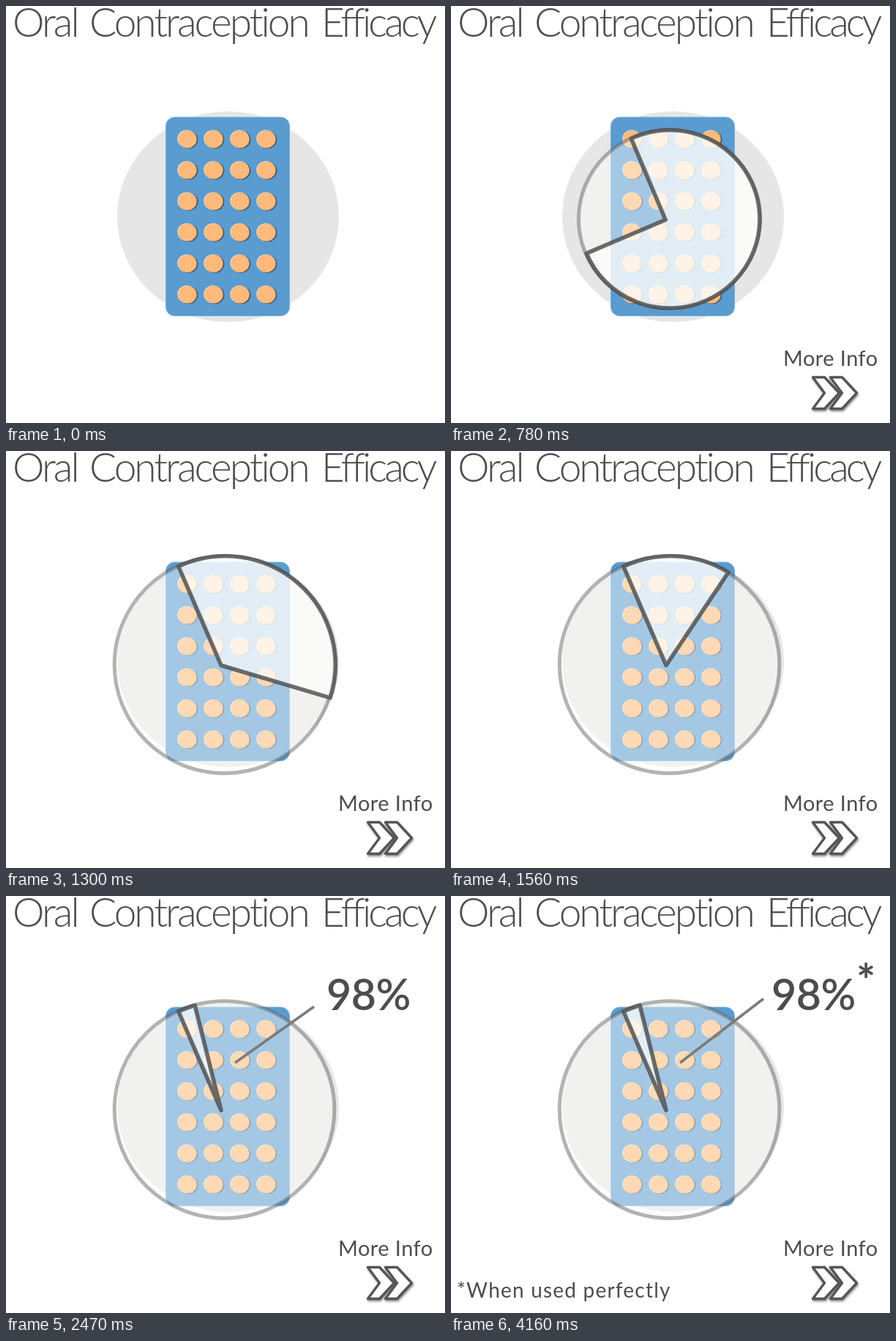
An HTML page that plays this animation: 600x570 px, repeating every 6.89 s.

```html
<!DOCTYPE html>
<html lang="en">
<head>
<meta charset="utf-8">
<title>Oral Contraception Efficacy</title>
<style>
  html, body { margin: 0; width: 100%; height: 100%; overflow: hidden; background: #fff; }
  svg { display: block; width: 600px; height: 570px; }
  text { font-family: Lato, "Open Sans", sans-serif; fill: #4d4d4f; }
  #title { font-size: 55px; font-weight: 300; letter-spacing: -3px; }
  #title .tight { letter-spacing: -4px; }
  #value { font-size: 59px; font-weight: 600; letter-spacing: -.5px; }
  #star { font-size: 62px; font-weight: 700; }
  #more text { font-size: 29px; letter-spacing: .45px; }
  #note { font-size: 28px; letter-spacing: 1.2px; }
  .chevron { fill: #fff; stroke: #555; stroke-width: 3.4; stroke-linejoin: round; }
  #more g { filter: drop-shadow(1px 2px 1.5px rgba(0, 0, 0, .45)); }
  #disc { fill: rgba(253, 254, 250, .45); stroke: rgba(96, 96, 96, .48); stroke-width: 5; }
  #wedge { fill: rgba(255, 255, 254, .68); stroke: rgba(80, 80, 80, .84); stroke-width: 5.6; stroke-linejoin: round; }
  #pointer { stroke: #7b7b7b; stroke-width: 3.6; }
</style>
</head>
<body>
<svg viewBox="0 0 600 570">
  <text id="title" y="42"><tspan x="9">Oral</tspan> <tspan x="114">Contraception</tspan> <tspan x="431" class="tight">Efficacy</tspan></text>
  <ellipse cx="303.5" cy="288" rx="151.5" ry="144" fill="#e6e6e6"/>
  <rect x="218.5" y="152" width="169" height="271.5" rx="12" fill="#5a9bd0" stroke="#78acd9"/>
  <g id="pills"></g>
  <ellipse id="disc"/>
  <path id="wedge"/>
  <line id="pointer" x1="313" y1="228"/>
  <text id="value" x="438" y="155.500">98%</text>
  <text id="star" x="554" y="138">*</text>
  <g id="more">
    <text x="454" y="492">More Info</text>
    <g>
      <path class="chevron" d="M494.500 507.500h16l20 21.500-20 21.500h-16l16-21.500z"/>
      <path class="chevron" d="M518.500 507.500h16l20 21.500-20 21.500h-16l16-21.500z"/>
    </g>
  </g>
  <text id="note" x="8" y="549">*When used perfectly</text>
</svg>
<script>
const LOOP = 6890, STEP = 130, LAST = 4160;
const $ = id => document.getElementById(id);
const set = (id, attrs) => {
  for (const name in attrs) $(id).setAttribute(name, attrs[name]);
};

// Key tables: [time, value], linear in between.
const tracks = {
  size: [[260, 0], [390, .06], [520, .31], [780, .82], [910, 1]],
  sweep: [[390, 335], [520, 311], [1040, 183.8], [1560, 31.8], [1820, -16.2]],
  button: [[130, .6], [260, .9], [390, 1.08], [520, .965], [650, 1]],
  pointer: [[1820, 0], [2340, 1]],
  tipX: [[2340, 420.5], [4160, 427]],
  tipY: [[2340, 152], [4160, 140.5]],
  value: [[1820, 0], [2210, 1]]
};

function at(name, t) {
  const keys = tracks[name];
  if (t <= keys[0][0]) return keys[0][1];
  for (let i = 1; i < keys.length; i++) {
    const [t0, a] = keys[i - 1], [t1, b] = keys[i];
    if (t <= t1) return a + (b - a) * (t - t0) / (t1 - t0);
  }
  return keys[keys.length - 1][1];
}

function drawPills() {
  const pill = (x, y, fill) => `<ellipse cx="${x}" cy="${y}" rx="12.7" ry="12.1" fill="${fill}"/>`;
  let html = '';
  for (let row = 0; row < 6; row++) {
    for (let col = 0; col < 4; col++) {
      const x = 248 + col * 36, y = 182 + row * 42.5;
      html += pill(x + 1.6, y + .6, '#4d4f52') + pill(x - 1, y - .5, '#f8e2cb') + pill(x, y, '#fdba7c');
    }
  }
  $('pills').innerHTML = html;
}

function drawPie(t) {
  const size = at('size', t), end = at('sweep', t), start = -25.3;
  const cx = 294 + 4.5 * size, cy = 288 + 4 * size;
  const rx = 150.3 * size, ry = 148.5 * size;
  // The wedge sits slightly right of the disc.
  const rim = deg => {
    const a = deg * Math.PI / 180;
    return `${cx + 1.5 * size + rx * Math.sin(a)} ${cy - ry * Math.cos(a)}`;
  };
  const visible = size > 0 ? 1 : 0;
  set('disc', { cx, cy, rx, ry, opacity: visible });
  set('wedge', {
    d: `M${cx - 4.5} ${cy + 1}L${rim(start)}A${rx} ${ry} 0 ${end - start > 180 ? 1 : 0} 1 ${rim(end)}Z`,
    opacity: visible
  });
}

function draw(t) {
  drawPie(t);
  const grow = at('pointer', t), scale = at('button', t);
  set('pointer', {
    x2: 313 + (at('tipX', t) - 313) * grow,
    y2: 228 + (at('tipY', t) - 228) * grow,
    opacity: grow > 0 ? 1 : 0
  });
  set('value', { opacity: at('value', t) });
  set('star', { opacity: t >= 2730 ? 1 : 0 });
  set('note', { opacity: t >= 3250 ? 1 : 0 });
  set('more', {
    opacity: t >= 130 ? 1 : 0,
    transform: `translate(520 514) scale(${scale}) translate(-520 -514)`
  });
}

const began = performance.now();
function tick() {
  const t = (performance.now() - began) % LOOP;
  draw(Math.min(LAST, Math.floor(t / STEP) * STEP));
  requestAnimationFrame(tick);
}
drawPills();
tick();
</script>
</body>
</html>
```
